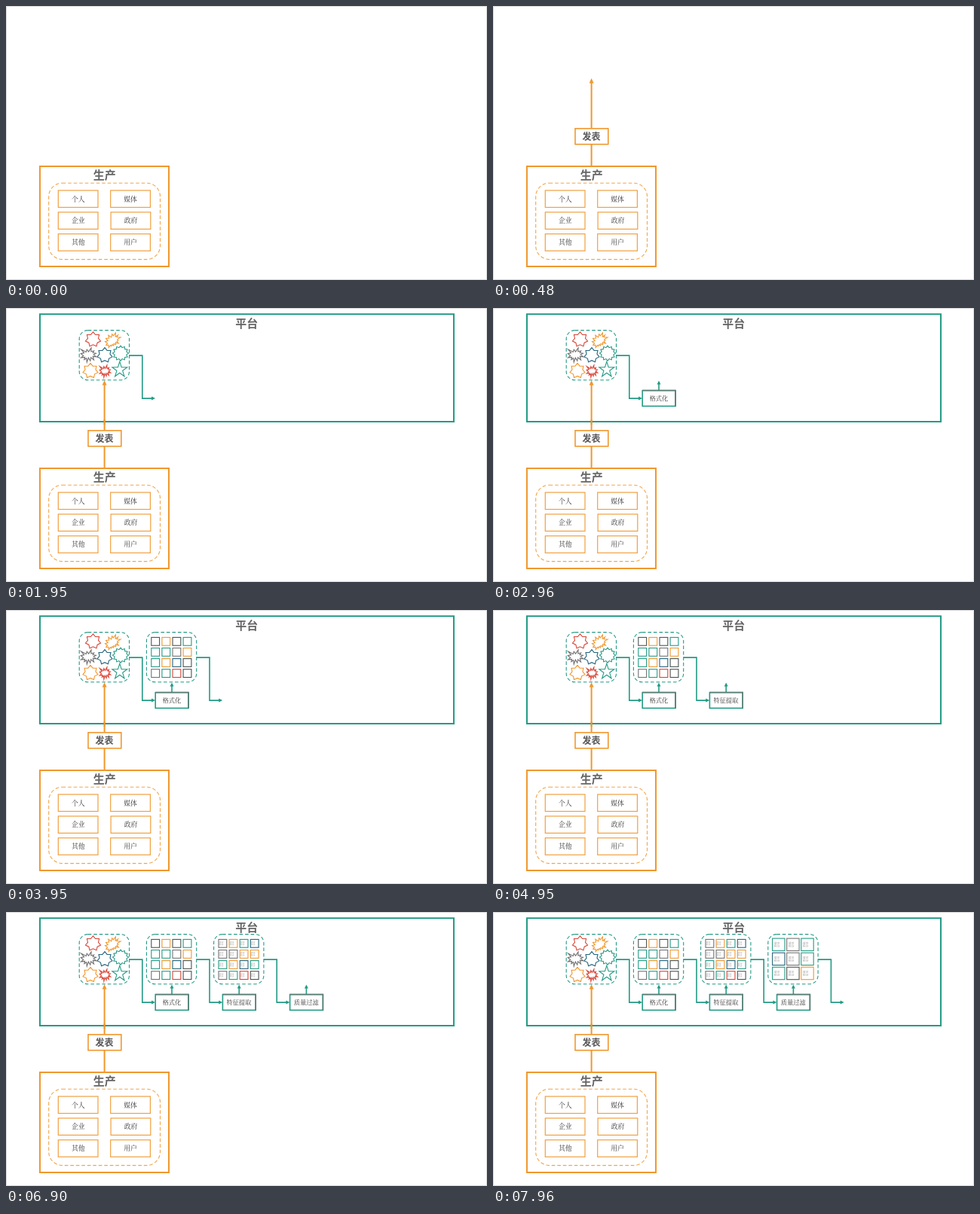
Animation, 638 px wide and 364 px high, one loop 8 s. Source, as an HTML page with a canvas:

```html
<!DOCTYPE html>
<html lang="zh-CN">
<head>
<meta charset="utf-8">
<style>
html, body { margin: 0; width: 100%; height: 100%; overflow: hidden; background: #fff; }
canvas { display: block; width: 638px; height: 364px; }
</style>
</head>
<body>
<canvas id="stage"></canvas>
<script>
const W = 638, H = 364, LOOP = 8000, STEP = 89.2;
const canvas = document.getElementById('stage');
const ctx = canvas.getContext('2d');
const dpr = window.devicePixelRatio || 1;
canvas.width = W * dpr;
canvas.height = H * dpr;

const ORANGE = '#f0982f', GREEN = '#249b85', GRAY = '#737373';
const NAVY = '#23657e', RED = '#d94436', DARK = '#4b5553';
const INK = { o: ORANGE, g: GREEN, s: GRAY, n: NAVY, r: RED, d: DARK };
const SANS = '"Noto Sans CJK SC", sans-serif';
const SERIF = '"Noto Serif CJK SC", "Noto Sans CJK SC", serif';

// Burst outlines in percent of their box
const BURST_A = [50,27, 67,0, 66,25, 85,21, 77,34, 98,38, 82,48, 100,62, 78,60, 84,84,
  65,67, 61,91, 49,69, 39,100, 36,72, 22,82, 26,65, 1,68, 17,55, 0,40, 21,35, 2,11, 34,29, 39,11];
const BURST_B = [53,20, 68,0, 67,27, 83,15, 76,30, 100,31, 79,44, 85,52, 76,57, 87,72,
  68,66, 69,80, 56,74, 54,87, 46,80, 40,91, 35,84, 23,100, 22,84, 6,83, 15,71, 0,60,
  18,54, 5,38, 25,36, 21,17, 40,30, 45,9];

function rect(x, y, w, h, color, lw, fill) {
  if (fill) {
    ctx.fillStyle = fill;
    ctx.fillRect(x, y, w, h);
  }
  ctx.strokeStyle = color;
  ctx.lineWidth = lw;
  ctx.strokeRect(x, y, w, h);
}

function line(points, color, lw) {
  ctx.beginPath();
  points.forEach(([x, y]) => ctx.lineTo(x, y));
  ctx.strokeStyle = color;
  ctx.lineWidth = lw;
  ctx.stroke();
}

function shape(points, color) {
  ctx.beginPath();
  points.forEach(([x, y]) => ctx.lineTo(x, y));
  ctx.closePath();
  ctx.strokeStyle = color;
  ctx.lineWidth = 1.1;
  ctx.stroke();
}

function head(x, y, angle, len, half, color) {
  ctx.save();
  ctx.translate(x, y);
  ctx.rotate(angle);
  ctx.beginPath();
  ctx.moveTo(0, 0);
  ctx.lineTo(-len, -half);
  ctx.lineTo(-len, half);
  ctx.fillStyle = color;
  ctx.fill();
  ctx.restore();
}

function label(text, x, y, size, font, color, weight = 'normal') {
  ctx.font = `${weight} ${size}px ${font}`;
  ctx.textAlign = 'center';
  ctx.fillStyle = color;
  ctx.fillText(text, x, y + size * 0.38);
}

function dashedBox(x, y, w, h, r, color) {
  ctx.setLineDash([4.6, 2.9]);
  ctx.beginPath();
  ctx.roundRect(x, y, w, h, r);
  ctx.strokeStyle = color;
  ctx.lineWidth = 1.1;
  ctx.stroke();
  ctx.setLineDash([]);
}

function star(x, y, n, rx, ry, inner, color) {
  const points = [];
  for (let i = 0; i < n * 2; i++) {
    const a = i * Math.PI / n - Math.PI / 2, k = i % 2 ? inner : 1;
    points.push([x + rx * k * Math.cos(a), y + ry * k * Math.sin(a)]);
  }
  shape(points, color);
}

function burst(data, x, y, w, h, color) {
  const points = [];
  for (let i = 0; i < data.length; i += 2) {
    points.push([x + data[i] * w / 100, y + data[i + 1] * h / 100]);
  }
  shape(points, color);
}

function production() {
  rect(45, 213, 171, 133, ORANGE, 2);
  label('生产', 130.7, 224.5, 15, SANS, '#666', 'bold');
  dashedBox(56.7, 235.2, 147.8, 101.4, 18, '#f2a549');
  ['个人', '媒体', '企业', '政府', '其他', '用户'].forEach((text, i) => {
    const row = i >> 1, x = i % 2 ? 138.7 + (row === 1) * 0.4 : 69.3;
    const y = 245 + row * 28.9;
    rect(x, y, 52.7, 22.5, '#f1a040', 1.2);
    label(text, x + 26.4, y + 11.2, 8.8, SERIF, '#383838');
  });
}

function publish() {
  line([[130.6, 212], [130.6, 101]], ORANGE, 2);
  head(130.6, 96, -Math.PI / 2, 6.5, 3, ORANGE);
  rect(109, 162.8, 43.8, 20.9, ORANGE, 1.6, '#fff');
  label('发表', 130.5, 173.3, 12, SANS, '#595959', 'bold');
}

function platform() {
  rect(45, 8.2, 549, 142.8, GREEN, 2);
  label('平台', 319.3, 20, 15, SANS, '#666', 'bold');
  line([[130.6, 155], [130.6, 148]], ORANGE, 2);
}

function group(i) {
  dashedBox(97.2 + i * STEP, 29.6, 66.3, 66.2, 11.5, GREEN);
}

function rawItems() {
  group(0);
  star(115.5, 41.8, 7, 10.3, 10, 0.7, RED);
  burst(BURST_B, 131.5, 33, 20.5, 19.5, ORANGE);
  burst(BURST_A, 99.3, 53, 20.5, 19, GRAY);
  star(131, 62.7, 7, 10.2, 10, 0.7, NAVY);
  star(152, 60.1, 12, 10.5, 10, 0.77, GREEN);
  star(112, 83.4, 7, 10.2, 10, 0.7, ORANGE);
  burst(BURST_A, 124.2, 76, 14.5, 16, RED);
  star(150.8, 82, 5, 10.5, 10.8, 0.39, GREEN);
}

function note(x, y, size) {
  ctx.save();
  ctx.translate(x, y);
  ctx.rotate(Math.PI / 2);
  label('数值', 0, 1.2 - size / 2, size * 0.85, SANS, '#b5b5b5');
  label('特征', 0, 1.2 + size / 2, size * 0.85, SANS, '#999');
  ctx.restore();
}

function cells(x0, y0, n, step, size, colors, noteSize) {
  [...colors].forEach((c, i) => {
    const x = x0 + i % n * step, y = y0 + Math.floor(i / n) * step;
    rect(x, y, size, size, INK[c], 1.1);
    if (noteSize) note(x + size * 0.42, y + size / 2, noteSize);
  });
}

function formatted() {
  group(1);
  cells(192.8, 36.4, 4, 14.1, 10.8, 'dodgggsogondsgrd');
}

function features() {
  group(2);
  cells(282, 36.4, 4, 14.1, 10.8, 'sognssoogonggsgrd'.replace('gg', 'g'), 3.3);
}

function filtered() {
  group(3);
  cells(370.6, 35.1, 3, 19.1, 16.4, 'gsgnsggdo', 4.4);
}

function connector(i) {
  const x = 163.5 + i * STEP;
  line([[x, 63.1], [x + 17.3, 63.1], [x + 17.3, 120.1], [x + 31, 120.1]], GREEN, 1.6);
  head(x + 34.5, 120.1, 0, 5, 2.5, GREEN);
}

function stage(i, text) {
  const x = 198.2 + i * STEP, y = 109.6, w = 43.8, h = 20.8;
  rect(x, y, w, h, GREEN, 1.6, '#fff');
  line([[x, y], [x + w, y], [x + w, y + h]], '#5f7a74', 1.5);
  label(text, x + w / 2 - 0.3, 119.8, 8.2, SERIF, '#383838');
}

function rise(i) {
  const x = 220 + i * STEP;
  line([[x, 109], [x, 100]], GREEN, 1.6);
  head(x, 96.5, -Math.PI / 2, 5, 2.5, GREEN);
}

const timeline = [
  [0, production],
  [480, publish],
  [1010, platform],
  [1470, rawItems],
  [1950, () => connector(0)],
  [2480, () => stage(0, '格式化')],
  [2960, () => rise(0)],
  [3490, formatted],
  [3950, () => connector(1)],
  [4430, () => stage(1, '特征提取')],
  [4950, () => rise(1)],
  [5430, features],
  [5960, () => connector(2)],
  [6420, () => stage(2, '质量过滤')],
  [6900, () => rise(2)],
  [7440, filtered],
  [7960, () => connector(3)]
];

const start = performance.now();

function draw(now) {
  const t = Math.max(0, now - start) % LOOP;
  ctx.setTransform(dpr, 0, 0, dpr, 0, 0);
  ctx.fillStyle = '#fff';
  ctx.fillRect(0, 0, W, H);
  rect(0.5, 0.5, W - 1, H - 1, '#d9d9d9', 1);
  for (const [time, paint] of timeline) {
    if (t >= time) paint();
  }
  requestAnimationFrame(draw);
}

draw(start);
</script>
</body>
</html>
```
